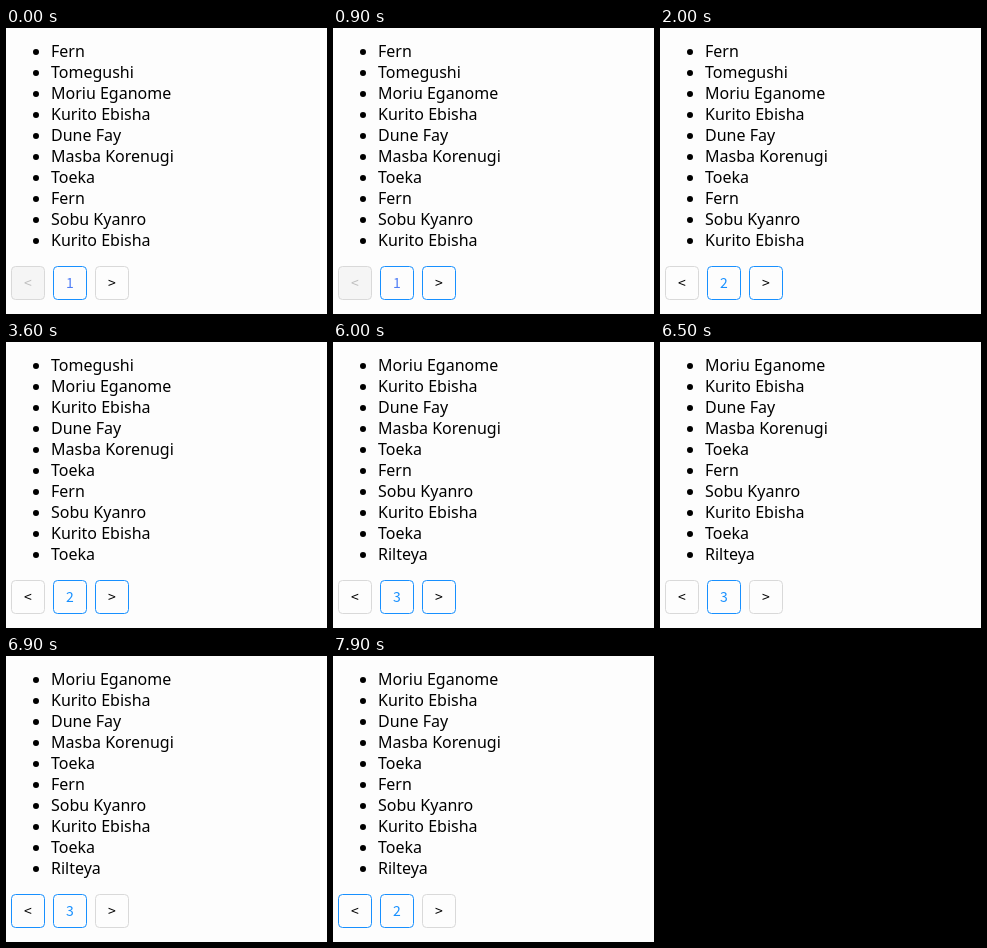
Animation of 321x286 px, one loop 8000 ms. Source, as an HTML page:

```html
<!DOCTYPE html>
<html lang="en">
<head>
<meta charset="utf-8">
<title>Paged list</title>
<style>
  html, body { margin: 0; width: 100%; height: 100%; overflow: hidden; background: #fdfdfd; }
  svg { display: block; }

  .names { font: 16px "Noto Sans", "Open Sans", sans-serif; fill: #000; }
  .pager { font: 14px "Noto Sans CJK SC", "Noto Sans CJK JP", "Noto Sans", sans-serif; text-anchor: middle; }
  .pager rect { fill: #fdfdfd; stroke: #d9d9d9; }
  .pager .current { stroke: #1890ff; }
  .pager .digit { fill: #1890ff; }
  .pager .first { fill: #4f7df5; }

  .names, .pager * { animation: 8s step-end infinite; }
  .names { animation-name: scroll; }
  .pager .prev { animation-name: prev-fill, prev-border; }
  .pager .prev-arrow { animation-name: prev-arrow; }
  .pager .next { animation-name: next-border; }
  .pager .first { animation-name: page-1; }
  .pager .second { animation-name: page-2; }
  .pager .third { animation-name: page-3; }

  @keyframes scroll {
    0% { transform: none; }
    45% { transform: translateY(-21px); }
    75%, 100% { transform: translateY(-42px); }
  }
  @keyframes prev-fill {
    0% { fill: #f5f5f5; }
    25%, 100% { fill: #fdfdfd; }
  }
  @keyframes prev-arrow {
    0% { fill: #bfbfbf; }
    25%, 100% { fill: #000; }
  }
  @keyframes prev-border {
    0% { stroke: #d9d9d9; }
    83.75% { stroke: #b2cae1; }
    85% { stroke: #5ba9f1; }
    86.25%, 100% { stroke: #1890ff; }
  }
  @keyframes next-border {
    0% { stroke: #d9d9d9; }
    10% { stroke: #79b5ec; }
    11.25% { stroke: #1890ff; }
    77.5% { stroke: #3f9ff7; }
    80% { stroke: #b2cae1; }
    81.25%, 100% { stroke: #d9d9d9; }
  }
  @keyframes page-1 {
    0% { opacity: 1; }
    25%, 100% { opacity: 0; }
  }
  @keyframes page-2 {
    0% { opacity: 0; }
    25% { opacity: 1; }
    56.25% { opacity: 0; }
    98.75%, 100% { opacity: 1; }
  }
  @keyframes page-3 {
    0% { opacity: 0; }
    56.25% { opacity: 1; }
    98.75%, 100% { opacity: 0; }
  }
</style>
</head>
<body>
<svg width="321" height="286" viewBox="0 0 321 286">
  <clipPath id="window"><rect y="13" width="321" height="210"/></clipPath>

  <!-- bullets: zero-length dashes with round caps -->
  <path d="M30 24v190" stroke="#000" stroke-width="6" stroke-linecap="round" stroke-dasharray="0 21"/>

  <g clip-path="url(#window)">
    <text class="names" y="8">
      <tspan x="45" dy="21">Fern</tspan>
      <tspan x="45" dy="21">Tomegushi</tspan>
      <tspan x="45" dy="21">Moriu Eganome</tspan>
      <tspan x="45" dy="21">Kurito Ebisha</tspan>
      <tspan x="45" dy="21">Dune Fay</tspan>
      <tspan x="45" dy="21">Masba Korenugi</tspan>
      <tspan x="45" dy="21">Toeka</tspan>
      <tspan x="45" dy="21">Fern</tspan>
      <tspan x="45" dy="21">Sobu Kyanro</tspan>
      <tspan x="45" dy="21">Kurito Ebisha</tspan>
      <tspan x="45" dy="21">Toeka</tspan>
      <tspan x="45" dy="21">Rilteya</tspan>
    </text>
  </g>

  <g class="pager">
    <rect class="prev" x="5.5" y="238.5" width="33" height="33" rx="4"/>
    <rect class="current" x="47.5" y="238.5" width="33" height="33" rx="4"/>
    <rect class="next" x="89.5" y="238.5" width="33" height="33" rx="4"/>
    <text class="prev-arrow" x="22" y="260">&lt;</text>
    <text class="digit first" x="64" y="260">1</text>
    <text class="digit second" x="64" y="260">2</text>
    <text class="digit third" x="64" y="260">3</text>
    <text x="106" y="260">&gt;</text>
  </g>
</svg>
</body>
</html>
```
